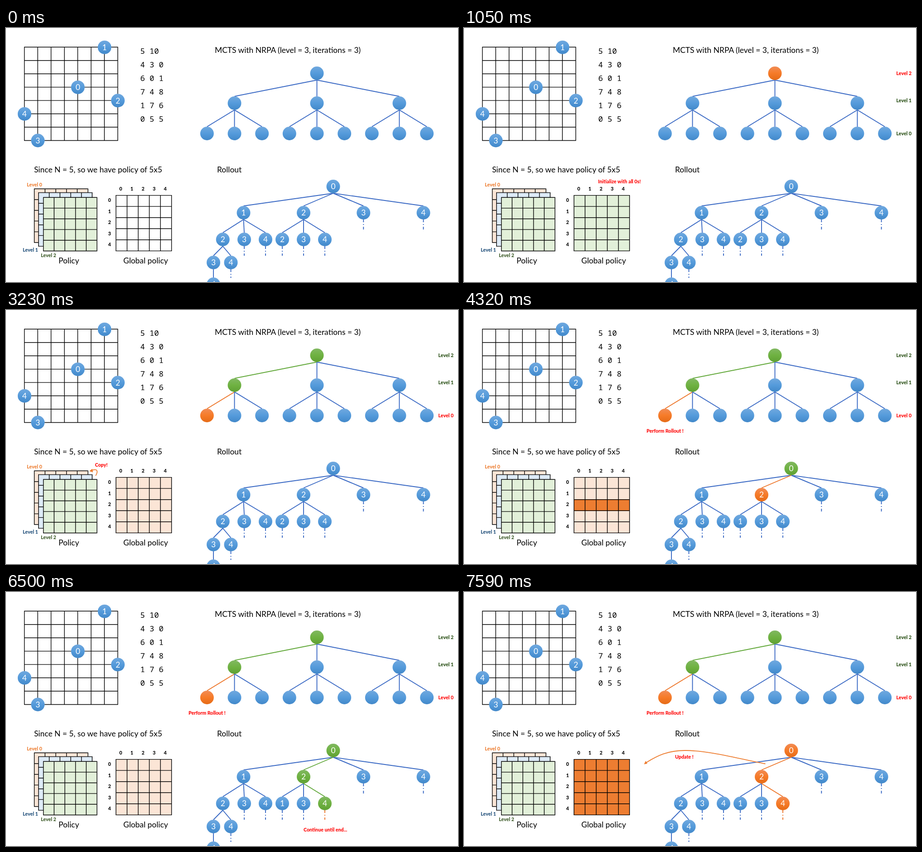
Animation, 998 px wide and 561 px high, one loop 8 s. Source, as an HTML page:

```html
<!DOCTYPE html>
<html lang="en">
<head>
<meta charset="utf-8">
<style>
  html, body { margin: 0; width: 100%; height: 100%; overflow: hidden; background: #fff; }
  svg { display: block; width: 100vw; height: 100vh; }
  text { font-family: Lato, Calibri, sans-serif; white-space: pre; }
  .mono { font-family: "Noto Sans Mono", monospace; font-weight: 500; }
  .small { font-weight: 800; }
</style>
</head>
<body>
<svg id="stage" viewBox="0 0 998 561"></svg>
<script>
const LOOP = 8000;
const RED = '#ff0000', DARK_GREEN = '#274e13';
const PEACH = '#fbe5d6', PALE_BLUE = '#deebf7', PALE_GREEN = '#e2f0d9', STRONG = '#ed7d31';
const LINE = { blue: '#3a69c4', orange: '#ed7427', green: '#62a83a' };
const GRADIENT = {
  blue: ['#70a8de', '#559bdb', '#4288c9'],
  orange: ['#f18c55', '#f67b28', '#e56b17'],
  green: ['#81b861', '#6fb242', '#5fa033']
};

// search: colours of root, first child, first leaf; rollout: colours of nodes 0, 2, 4
const steps = [
  { at: 0, fill: '#fff' },
  { at: 1050, level: 2, search: ['orange'], fill: PALE_GREEN, note: ['Initialize with all 0s!', 296, 339] },
  { at: 2140, level: 1, search: ['green', 'orange'], fill: PALE_BLUE, copy: [0, 0] },
  { at: 3230, level: 0, search: ['green', 'green', 'orange'], fill: PEACH, copy: [-9, -8] },
  { at: 4320, level: 0, rollout: ['green', 'orange'], row: 2 },
  { at: 5410, level: 0, rollout: ['green', 'green', 'orange'], row: 4 },
  { at: 6500, level: 0, rollout: ['green', 'green', 'green'], stub: 'orange',
    note: ['Continue until end...', 657, 525] },
  { at: 7590, level: 0, rollout: ['orange', 'orange', 'orange'], stub: 'orange', fill: STRONG,
    note: ['Update !', 466, 364], update: true }
].map(step => step.rollout
  ? { search: ['green', 'green', 'orange'], fill: PEACH, perform: true, ...step }
  : { search: [], rollout: [], ...step });

const range = n => [...Array(n).keys()];

// y is the middle of the capitals
function text(str, x, y, { size = 17.4, fill = '#000', anchor = 'start', cls = '' } = {}) {
  return `<text x="${x}" y="${y + size * 0.36}" font-size="${size}" fill="${fill}" text-anchor="${anchor}" class="${cls}">${str}</text>`;
}
const small = (str, x, y, fill = '#000', anchor) => text(str, x, y, { size: 10.7, fill, anchor, cls: 'small' });

function line(x1, y1, x2, y2, color = 'blue', extra = '') {
  return `<path d="M${x1} ${y1}L${x2} ${y2}" stroke="${LINE[color]}" stroke-width="1.9" ${extra}/>`;
}
const edge = (a, b, color) => line(a[0], a[1] + 15, b[0], b[1] - 15, color);
const stub = (x, y, length, color) =>
  line(x, y + 15, x, y + 15 + length, color, 'stroke-dasharray="6 4 2 4"');

function node([x, y], label = '', color = 'blue') {
  return `<circle cx="${x}" cy="${y}" r="15" fill="url(#${color})"/>` +
    text(label, x, y, { fill: '#fff', anchor: 'middle' });
}

function grid(x, y, n, cell, fill, row) {
  const side = n * cell;
  const band = row === undefined ? '' :
    `<rect x="${x}" y="${y + row * cell}" width="${side}" height="${cell}" fill="${STRONG}"/>`;
  const rules = range(n + 1).map(i =>
    `M${x} ${y + i * cell}h${side}M${x + i * cell} ${y}v${side}`).join('');
  return `<rect x="${x}" y="${y}" width="${side}" height="${side}" fill="${fill}"/>${band}` +
    `<path d="${rules}" stroke="#000" stroke-width="1.4" stroke-linecap="square"/>`;
}

function board() {
  const cities = [[4, 3], [6, 0], [7, 4], [1, 7], [0, 5]];
  const rows = ['5 10', '4 3 0', '6 0 1', '7 4 8', '1 7 6', '0 5 5'];
  return grid(40.6, 42.3, 7, 29.45, '#fff') +
    cities.map(([x, y], i) => node([40.9 + x * 29.45, 42.7 + y * 29.4], i)).join('') +
    rows.map((str, i) => text(str, 296.5, 51 + i * 30, { size: 17.1, cls: 'mono' })).join('');
}

function searchTree({ search, level, perform }) {
  const root = [686.5, 100];
  let edges = '', nodes = node(root, '', search[0]);
  for (const i of range(3)) {
    const child = [504.5 + i * 182, 166];
    const childColor = i ? 'blue' : search[1];
    edges += edge(root, child, childColor);
    nodes += node(child, '', childColor);
    for (const j of range(3)) {
      const leaf = [child[0] + (j - 1) * 60.7, 233];
      const leafColor = i || j ? 'blue' : search[2];
      edges += edge(child, leaf, leafColor);
      nodes += node(leaf, '', leafColor);
    }
  }
  const levels = level === undefined ? '' : [233, 160, 100].map((y, i) =>
    small(`Level ${i}`, 954.5, y, i === level ? RED : DARK_GREEN)).join('');
  return text('MCTS with NRPA (level = 3, iterations = 3)', 461, 49) + edges + nodes + levels +
    (perform ? small('Perform Rollout !', 403, 267, RED) : '');
}

function policies({ fill, row, copy }) {
  const headers = range(5).map(i =>
    small(i, 253.3 + i * 24.6, 355.5, '#000', 'middle') +
    small(i, 228.5, 380.5 + i * 24.5, '#000', 'middle')).join('');
  const copyMark = copy ? `<g transform="translate(${copy})">
    <path d="M207 374C213 364 211 357 197 363" stroke="${STRONG}" stroke-width="1.8"/>
    <path d="M193 364l6.5 -5.5l1.5 8z" fill="${STRONG}"/>${small('Copy!', 205.5, 350, RED)}</g>` : '';
  return text('Since N = 5, so we have policy of 5x5', 62, 313) +
    grid(62.5, 355.3, 5, 23.7, PEACH) +
    grid(71.8, 363.6, 5, 23.7, PALE_BLUE) +
    grid(82.6, 374.2, 5, 23.65, PALE_GREEN) +
    small('Level 0', 46, 346, STRONG) +
    small('Level 1', 37, 490, '#1f4e79') +
    small('Level 2', 77, 502, '#385723') +
    text('Policy', 116, 514) + text('Global policy', 259, 514) +
    grid(242.8, 369.6, 5, 24.55, fill, row) + headers + copyMark;
}

function rolloutTree({ rollout, stub: stubColor, update }) {
  const root = [722.5, 350];
  const [one, two, three, four] = [524.5, 657, 789.3, 921.6].map(x => [x, 408]);
  const deep = [478.7, 467], deeper = [458, 518], side = [496.5, 518], last = [458, 566];
  // parent, position, label, colour, stub length, stub colour
  const children = [
    [root, one, 1], [root, three, 3, 'blue', 24], [root, four, 4, 'blue', 24],
    [root, two, 2, rollout[1]],
    [one, deep, 2], [one, [526, 467], 3, 'blue', 21], [one, [573, 467], 4, 'blue', 21],
    [two, [610, 467], rollout.length ? 1 : 2, 'blue', 21], [two, [657, 467], 3, 'blue', 21],
    [two, [704, 467], 4, rollout[2], 21, stubColor],
    [deep, deeper, 3], [deep, side, 4, 'blue', 19], [deeper, last, 4]
  ];
  const edges = children.map(([from, to, , color, length, tail]) =>
    edge(from, to, color) + (length ? stub(...to, length, tail) : '')).join('');
  const nodes = children.map(([, at, label, color]) => node(at, label, color)).join('');
  const arrow = update ? `<path d="M665.5 379.5C600 367 545 351 490 350C450 349.5 426 362 402 377"
    stroke="${STRONG}" stroke-width="1.9"/><path d="M397.5 380.5l3.5 -7.5l4 6z" fill="${STRONG}"/>` : '';
  return text('Rollout', 466, 313) + edges + node(root, 0, rollout[0]) + nodes + arrow;
}

const gradients = Object.entries(GRADIENT).map(([id, colors]) =>
  `<linearGradient id="${id}" x2="0" y2="1">${colors.map((color, i) =>
    `<stop offset="${i / 2}" stop-color="${color}"/>`).join('')}</linearGradient>`).join('');

const stage = document.getElementById('stage');
let shown;

function frame() {
  const time = performance.now() % LOOP;
  const step = steps.findLast(({ at }) => at <= time);
  if (step !== shown) {
    shown = step;
    stage.innerHTML = `<defs>${gradients}</defs><g fill="none">` +
      board() + searchTree(step) + policies(step) + rolloutTree(step) +
      (step.note ? small(...step.note, RED) : '') + '</g>';
  }
  requestAnimationFrame(frame);
}
frame();
</script>
</body>
</html>
```
